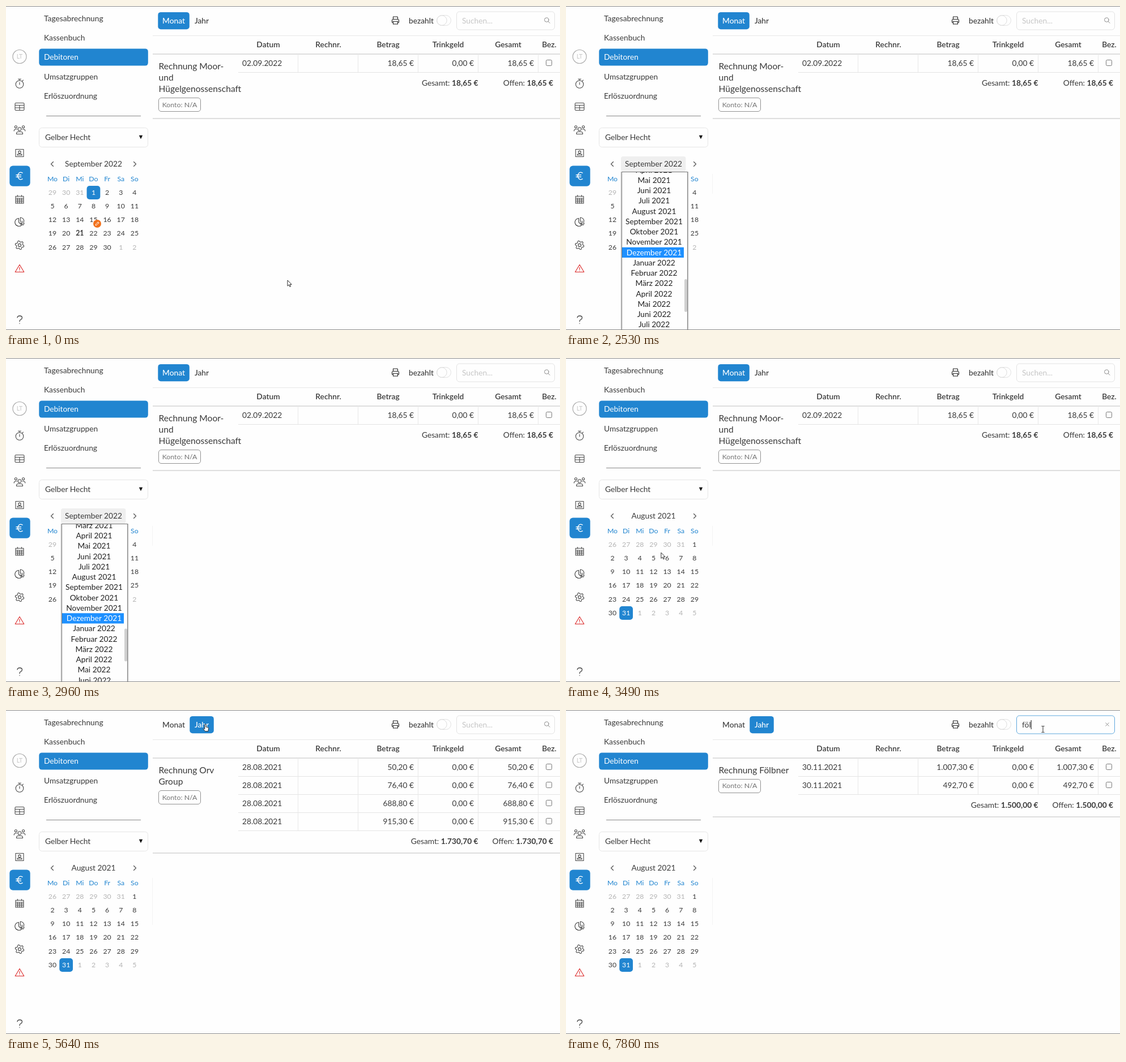
Animation, 978 px wide and 573 px high, one loop 8 s. Source, as an HTML page:

```html
<!DOCTYPE html>
<html lang="de">
<head>
<meta charset="utf-8">
<title>Debitoren</title>
<style>
html, body { margin: 0; width: 100%; height: 100%; overflow: hidden; background: #fefefe; }
svg { display: block; width: 978px; height: 573px; font-family: Lato, "Open Sans", sans-serif; font-size: 13.75px; fill: #3a3a3a; }
.icon { fill: none; stroke: #484848; stroke-width: 1.1; stroke-linecap: round; stroke-linejoin: round; }
</style>
</head>
<body>
<svg id="stage" viewBox="0 0 978 573"></svg>
<script>
const BLUE = '#2185d0', INK = '#3a3a3a', PAPER = '#fefefe', LOOP = 8000;
const MONTHS = ['Januar', 'Februar', 'März', 'April', 'Mai', 'Juni', 'Juli', 'August',
  'September', 'Oktober', 'November', 'Dezember'];

// y is the optical middle of the capitals
const text = (x, y, s, { at = 'start', size = 13.75, fill = INK, weight = 400, id = '' } = {}) =>
  `<text id="${id}" x="${x}" y="${y + size * 0.352}" text-anchor="${at}" font-size="${size}" fill="${fill}" font-weight="${weight}">${s}</text>`;
const mid = (x, y, s, o) => text(x, y, s, { at: 'middle', ...o });
const end = (x, y, s, o) => text(x, y, s, { at: 'end', ...o });
const rect = (x, y, w, h, fill, r = 0, stroke = 'none', id = '') =>
  `<rect id="${id}" x="${x}" y="${y}" width="${w}" height="${h}" fill="${fill}" rx="${r}" stroke="${stroke}"/>`;
const group = (id, body, attrs = '') => `<g id="${id}" ${attrs}>${body}</g>`;
const icon = (y, body, attrs = '', x = 24) => `<g class="icon" transform="translate(${x} ${y})" ${attrs}>${body}</g>`;
const path = d => `<path d="${d}"/>`;
const circle = (x, y, r, attrs = '') => `<circle cx="${x}" cy="${y}" r="${r}" ${attrs}/>`;
const euro = n => n.toFixed(2).replace('.', ',').replace(/\B(?=(\d{3})+,)/g, '.') + ' €';

function rail() {
  let teeth = '';
  for (let i = 0; i < 48; i++) {
    const a = i * Math.PI / 24, r = 6.7 + 1.1 * Math.tanh(2.5 * Math.sin(a * 6));
    teeth += `${i ? 'L' : 'M'}${(r * Math.cos(a)).toFixed(2)} ${(r * Math.sin(a)).toFixed(2)}`;
  }
  return circle(24, 89.5, 12, `fill="${PAPER}" stroke="#aaa" stroke-width="1.2"`) +
    mid(24, 89.5, 'LT', { size: 10.5, fill: '#c8c8c8' }) +
    icon(138, circle(0, 0.5, 6.8) + path('M0 -6.3V-8.8M-2.5 -8.8H2.5M0 -3V1M5 -5.5L6.3 -6.8')) +
    icon(178, path('M-6.5 -6.5H6.5Q8 -6.5 8 -5V5Q8 6.5 6.5 6.5H-6.5Q-8 6.5 -8 5V-5Q-8 -6.5 -6.5 -6.5ZM-8 -2.5H8M-8 2H8M0 -2.5V6.5')) +
    icon(219, circle(0, -1.3, 3) + circle(-6.6, -5.3, 2) + circle(6.6, -5.3, 2) +
      path('M-5.5 7.5V6.5Q-5.5 3.5 -2.5 3.5H2.5Q5.5 3.5 5.5 6.5V7.5ZM-9.8 2Q-9.8 -1 -7 -1H-5M9.8 2Q9.8 -1 7 -1H5')) +
    icon(260, path('M-7 -6.5H7V6.5H-7ZM-4 4Q-4 1.5 -1.5 1.5H1.5Q4 1.5 4 4Z') + circle(0, -1.7, 2.2)) +
    rect(6.3, 282.4, 36.4, 36.4, BLUE, 6) +
    icon(300.5, path('M5 -5.3Q0 -8.2 -2.6 -3Q-4 0 -2.6 3Q0 8.2 5 5.3M-6 -1.7H2.5M-6 1.7H2.5'), 'style="stroke:#fff;stroke-width:1.4"') +
    icon(342, path('M-7 -5.5H7V7H-7ZM-7 -2H7M-7 1H7M-7 4H7M-3.5 -2V7M0 -2V7M3.5 -2V7M-3.5 -7.5V-5M3.5 -7.5V-5')) +
    icon(382, path('M-1.5 -6.5A7 7 0 1 0 3.7 5.5L-1.5 .5ZM1.3 -8A7 7 0 0 1 8 -1H1.3ZM2 1.5H8Q8 4 6 5.5Z')) +
    icon(423, path(teeth + 'Z') + circle(0, 0, 2.6)) +
    icon(464, path('M0 -6.5L7.8 6.5H-7.8ZM0 -2V2.3M0 4.2V4.4'), 'style="stroke:#db2828"') +
    icon(555, path('M-4 -4Q-3.5 -7 0 -7Q4.5 -7 4.5 -3.7Q4.5 -1.5 2 -.5Q0 .5 0 3M0 6.3V6.6'), 'style="stroke-width:1.3"');
}

function menu() {
  const items = ['Tagesabrechnung', 'Kassenbuch', 'Debitoren', 'Umsatzgruppen', 'Erlöszuordnung'];
  return rect(58.3, 75.4, 192.5, 30.2, BLUE, 5) +
    items.map((s, i) => text(67, 22 + i * 34.25, s, { fill: i === 2 ? '#fff' : INK })).join('') +
    rect(71, 194, 167, 1, '#888') +
    rect(58.5, 215.5, 192, 34, PAPER, 5, '#e6e6e6') + text(69, 232.5, 'Gelber Hecht') +
    '<path d="M234.8 228.8H241.2L238 235.2Z" fill="#111"/>';
}

function calendar(id, title, before, lead, days, rows, picked, today) {
  let s = mid(154.5, 279.5, title);
  for (let i = 0; i < rows * 7; i++) {
    const x = 82 + 24.15 * (i % 7), y = 329.5 + 24.2 * Math.floor(i / 7), d = i - lead + 1;
    const inside = d > 0 && d <= days;
    if (d === picked) s += rect(x - 11.9, y - 11.4, 23.8, 23.8, BLUE, 5);
    s += mid(x, y, d < 1 ? before + d : inside ? d : d - days, {
      size: 12.3, weight: d === today ? 700 : 400,
      fill: d === picked ? '#fff' : inside ? INK : '#b4b4b4' });
  }
  return group(id, s);
}

function calendarFrame() {
  return ['Mo', 'Di', 'Mi', 'Do', 'Fr', 'Sa', 'So'].map((s, i) =>
    mid(82 + 24.15 * i, 305.5, s, { size: 12.3, fill: BLUE })).join('') +
    `<g class="icon">${path('M83.5 275.5L79.5 279.5L83.5 283.5M225.5 275.5L229.5 279.5L225.5 283.5')}</g>`;
}

function dropdown() {
  let names = '';
  for (let i = 0; i < 24; i++) {
    names += mid(155.5, 298 + 18.25 * (i - 4), `${MONTHS[i % 12]} ${2021 + Math.floor(i / 12)}`, { id: 'm' + i });
  }
  return group('drop',
    rect(96, 293, 121, 280, 'rgba(0,0,0,.12)') +
    rect(98.5, 293.5, 116, 290, PAPER, 0, '#767676') +
    `<g clip-path="url(#list)">${group('months', rect(99, 0, 109, 18.25, '#1e90ff', 0, 'none', 'mark') + names)}</g>` +
    rect(209, 485, 5, 58, '#d0d0d0', 2.5, 'none', 'thumb'));
}

// Each entry: name lines, date, amounts
function table(id, entries, dx = 0) {
  let s = '', y = 85;
  const right = 978 + dx, left = 410 + dx;
  for (const [names, date, sums] of entries) {
    const chip = y + 37 + 20.2 * (names.length - 1);
    names.forEach((n, i) => s += text(269.5, y + 21.5 + 20.2 * i, n, { size: 15.6 }));
    s += rect(269.5, Math.round(chip) + 0.5, 74, 24, PAPER, 4.5, '#929292') +
      mid(306.5, chip + 12, 'Konto: <tspan font-weight="500">N/A</tspan>', { size: 12.3, fill: '#777' });
    sums.forEach((sum, i) => {
      const top = y + 32 * i, c = top + 15.7;
      s += rect(left, Math.round(top + 31.5), right - left, 1, '#e4e4e4');
      for (let k = 0; k < 5; k++) s += rect(Math.round(515 + 105.9 * k) + dx, top, 1, 32, '#e8e8e8');
      s += text(417 + dx, c, date) + end(720 + dx, c, euro(sum)) + end(826 + dx, c, euro(0)) +
        end(932 + dx, c, euro(sum)) + rect(953.5 + dx, Math.round(c) - 5.5, 10, 10, PAPER, 2, '#767676');
    });
    const total = `<tspan font-weight="700">${euro(sums.reduce((a, b) => a + b))}</tspan>`;
    const c = y + 32 * sums.length + 19.5;
    s += end(833.5 + dx, c, 'Gesamt: ' + total) + end(966 + dx, c, 'Offen: ' + total);
    y += Math.max(32 * sums.length + 40, chip - y + 36.5);
    s += rect(259, Math.round(y) - 1, right - 259, 2, '#dedede');
  }
  if (dx) s += rect(971, 88, 5, 88, '#d0d0d0', 2.5);
  return group(id, s);
}

function header() {
  const heads = { Datum: 463, 'Rechnr.': 569, Betrag: 674.5, Trinkgeld: 780.5, Gesamt: 886.5, 'Bez.': 959 };
  return rect(259, 52, 719, 1, '#e8e8e8') + rect(259, 84, 719, 2, '#dedede') +
    Object.entries(heads).map(([s, x]) => mid(x, 68, s, { weight: 600 })).join('');
}

function toolbar() {
  return rect(268.3, 10.9, 55.5, 30.4, BLUE, 5, 'none', 'tab') +
    mid(296, 25.8, 'Monat', { weight: 500, id: 'tabMonth' }) +
    mid(345.5, 25.8, 'Jahr', { weight: 500, id: 'tabYear' }) +
    icon(25.5, path('M-4 -2V-6.5H3L4 -5.5V-2M-4 3.5H-6V0Q-6 -2 -4 -2H4Q6 -2 6 0V3.5H4M-4 1.8H4V6.5H-4Z'), 'style="stroke:#222"', 687.5) +
    rect(703, 10, 91.5, 32, '#f2f2f2', 5, 'none', 'paidHover') +
    text(711, 25.8, 'bezahlt', { weight: 500 }) +
    rect(760.5, 16.5, 25, 18, PAPER, 9, '#e2e2e2', 'pill') +
    circle(769.5, 25.5, 8.7, `fill="${PAPER}" stroke="#dcdcdc"`) +
    rect(795.5, 10, 173, 32, PAPER, 5, '#e3e3e3', 'box') +
    group('hint', text(805, 25.8, 'Suchen...', { fill: '#c6c6c6' }) +
      '<g class="icon" style="stroke:#8c8c8c;stroke-width:1">' + circle(954.3, 24.5, 3.7) + path('M957 27.2L960 30.2') + '</g>') +
    group('clear', '<path d="M952.5 22.5L958.5 28.5M958.5 22.5L952.5 28.5" stroke="#8c8c8c"/>') +
    text(805, 25.8, '', { id: 'query' }) +
    rect(805, 18, 1, 16, '#111', 0, 'none', 'caret');
}

const felmot = [['Rechnung', 'Felmot'], '10.06.2021', [230.6]];
const foelbner = [['Rechnung Fölbner'], '30.11.2021', [1007.3, 492.7]];

const stage = document.getElementById('stage');
stage.innerHTML = '<clipPath id="list"><rect x="99" y="294" width="115" height="279"/></clipPath>' +
  rail() + menu() +
  rect(258, 297, 1, 35, '#f3f3f3', 0, 'none', 'edge') +
  rect(97, 266, 114.5, 27, '#efefef', 4, 'none', 'titleHover') +
  calendarFrame() +
  calendar('september', 'September 2022', 31, 3, 30, 5, 1, 21) +
  group('badge', circle(161, 385, 7, 'fill="#f2711c"') +
    '<path d="M158 388L158.6 385.8L162.6 381.8L164.2 383.4L160.2 387.4ZM161.6 382.8L163.2 384.4" fill="none" stroke="#fff" stroke-width=".9"/>') +
  calendar('august', 'August 2021', 31, 6, 31, 6, 31) +
  header() + toolbar() +
  table('tSeptember', [[['Rechnung Moor-', 'und', 'Hügelgenossenschaft'], '02.09.2022', [18.65]]]) +
  table('tAugust', [[['Rechnung Orv', 'Group'], '28.08.2021', [50.2, 76.4, 688.8, 915.3]]]) +
  table('tYear', [
    [['Vormsel Group'], '15.09.2021', [747.5, 752.5]],
    [['Vormsel Group', 'Tip'], '15.09.2021', [100]],
    [['Rechnung QZU'], '28.07.2021', [733]],
    [['Rechnung Bad', 'Morlewang', 'Tourismus'], '08.10.2021', [24.6, 25.4]],
    felmot, foelbner], -10) +
  table('tFirst', [felmot, foelbner]) +
  table('tFound', [foelbner]) +
  dropdown() +
  rect(0, 0, 978, 1, '#8a8a8a') + rect(0, 572, 978, 1, '#8a8a8a') +
  group('cursor',
    group('arrow', path('M0 0V10.2L2.4 8L4 11.6L5.6 10.9L4.1 7.4H7.2Z')) +
    group('hand', path('M-1.2 1.2Q-1 0 0 0Q1 0 1.1 1.2V5L4.6 5.8Q5.8 6.2 5.6 7.6L4.8 12.6H-.4L-3.8 8.6Q-3.6 7 -1.2 8.4Z')) +
    group('beam', path('M-2.5 -5.5H-.7L0 -5L.7 -5.5H2.5M0 -5V5M-2.5 5.5H-.7L0 5L.7 5.5H2.5')),
    'fill="#fff" stroke="#222" stroke-width=".95"');

const ui = {};
stage.querySelectorAll('[id]').forEach(e => { if (e.id) ui[e.id] = e; else e.removeAttribute('id'); });
const set = (id, attrs) => { for (const k in attrs) ui[id].setAttribute(k, attrs[k]); };
const show = (id, on) => set(id, { display: on ? 'inline' : 'none' });

// Moves: start, end, from, to, easing
const out = pow => p => 1 - (1 - p) ** pow;
const inOut = p => p * p * (3 - 2 * p);
const MOVES = [
  [390, 1070, [497, 485], [171, 279], out(2)],
  [3400, 3810, [160, 390], [180, 274], out(2)],
  [4500, 5140, [181, 274], [352, 25], inOut],
  [6020, 6320, [350, 24], [746, 28], out(1.4)],
  [6320, 6620, [746, 28], [842, 34], out(2)]
];
function pointer(t) {
  const [a, b, from, to, ease] = MOVES.filter(m => t >= m[0]).pop() || MOVES[0];
  const e = ease(Math.min(1, Math.max(0, (t - a) / (b - a))));
  return from.map((v, i) => v + (to[i] - v) * e);
}

function render(t) {
  const [x, y] = pointer(t);
  const open = t >= 1420 && t < 3400, year = t >= 5640;
  const inside = (l, top, r, b) => x >= l && x <= r && y >= top && y <= b;

  const overTitle = inside(97, 266, 211, 293);
  const overPaid = inside(703, 10, 794, 42), overBox = inside(795, 10, 969, 42);
  const overTab = inside(268, 10, 367, 42);
  const link = overTitle || overPaid || overTab;
  set('cursor', { transform: `translate(${x.toFixed(2)} ${y.toFixed(2)})` });
  show('cursor', t < 2390 || t >= 3400);
  show('beam', overBox);
  show('hand', link);
  show('arrow', !link && !overBox);

  show('titleHover', open || (overTitle && t < 4510));
  set('titleHover', { fill: t >= 1420 && t < 1650 ? '#e6e6e6' : '#efefef' });
  show('september', t < 3400);
  show('badge', t < 3400);
  show('august', t >= 3400);
  show('edge', t >= 1420);
  set('edge', { height: t < 3500 ? 35 : 83 });

  show('drop', open);
  const shift = t < 2390 ? 0 : Math.min(37, (t - 2355) * 0.057);
  const marked = t < 2390 ? -1 : t < 3020 ? 11 : 7;
  set('months', { transform: `translate(0 ${shift.toFixed(2)})` });
  set('thumb', { y: 485 - shift * 0.19 });
  show('mark', marked >= 0);
  set('mark', { y: 298 + 18.25 * (marked - 4) - 9 });
  for (let i = 0; i < 24; i++) set('m' + i, { fill: i === marked ? '#fff' : '#222' });

  set('tab', { x: year ? 324.3 : 268.3, width: year ? 42.5 : 55.5 });
  set('tabMonth', { fill: year ? INK : '#fff' });
  set('tabYear', { fill: year ? '#fff' : INK });
  show('paidHover', overPaid);
  set('pill', { fill: overPaid ? '#dedede' : PAPER });

  const query = 'föl'.slice(0, t < 7440 ? 0 : t < 7730 ? 1 : t < 7860 ? 2 : 3);
  const focus = t >= 6860;
  set('box', { stroke: focus ? '#5fa8dd' : '#e3e3e3' });
  show('hint', !query);
  show('clear', query);
  show('caret', focus);
  if (ui.query.textContent !== query) ui.query.textContent = query;
  set('caret', { x: 805 + (query ? ui.query.getComputedTextLength() : 0) });

  const view = t < 3500 ? 'tSeptember' : t < 5700 ? 'tAugust' : t < 7440 ? 'tYear' : t < 7730 ? 'tFirst' : 'tFound';
  for (const v of ['tSeptember', 'tAugust', 'tYear', 'tFirst', 'tFound']) show(v, v === view);
}

const start = performance.now();
function tick() {
  render((performance.now() - start) % LOOP);
  requestAnimationFrame(tick);
}
tick();
</script>
</body>
</html>
```
